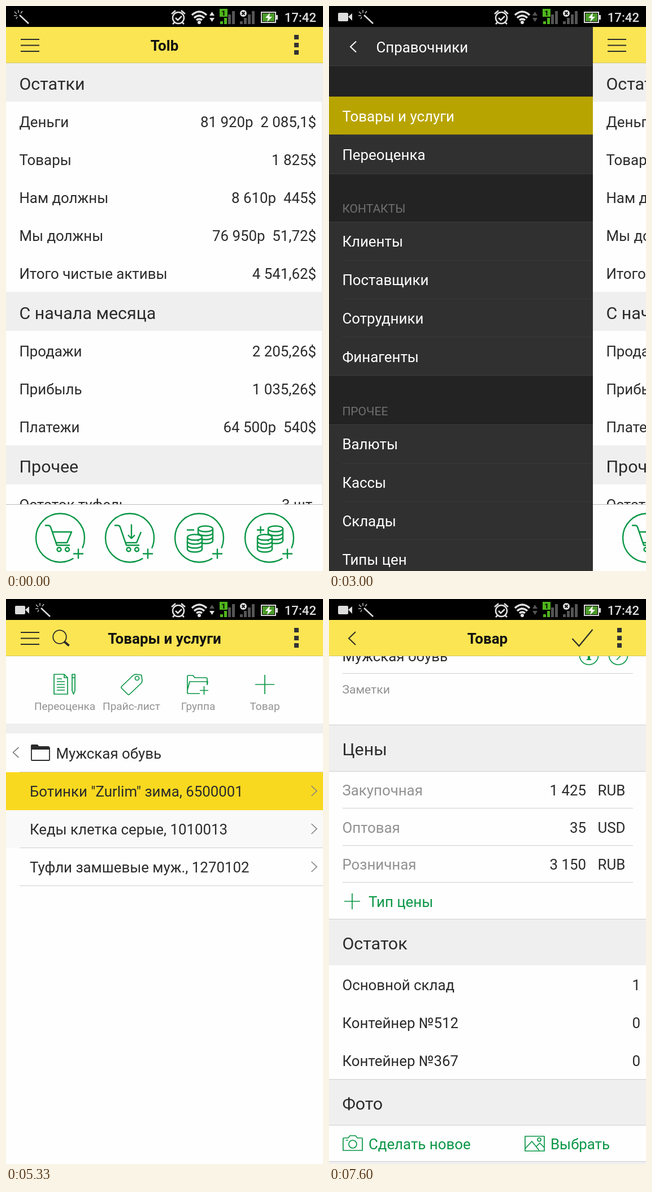
Animation of 561x998 px, one loop 7.67 s. Source, as an HTML page:

```html
<!DOCTYPE html>
<html lang="ru">
<head>
<meta charset="utf-8">
<title>Учёт товаров</title>
<style>
  html, body { margin: 0; width: 100%; height: 100%; overflow: hidden; background: #fefefe; }
  svg { display: block; width: 100vw; height: 100vh; font-family: Roboto, sans-serif; }
  .icon { fill: none; stroke: #0a9646; stroke-width: 1.7; stroke-linejoin: round; }
  .bold { stroke-width: 2.4; }
</style>
</head>
<body>
<svg id="stage" viewBox="0 0 561 998" preserveAspectRatio="none"></svg>
<script>
const W = 561, PANEL = 467, LOOP = 7670, LAST = 114, LEFT = 23.4;
const INK = '#2b2b2b', GREY = '#929292', GREEN = '#0a9646', BAND = '#efefef', LINE = '#cfcfcf';
const OLIVE = '#b8a400', GOLD = '#f9d91f';

// Drawing helpers; text is placed by the middle of its capitals.
const text = (x, y, s, { size = 25.85, fill = INK, anchor = 'start', weight = 400 } = {}) =>
  `<text x="${x}" y="${y + size * 0.355}" font-size="${size}" fill="${fill}" text-anchor="${anchor}" font-weight="${weight}">${s}</text>`;
const rect = (x, y, w, h, fill, extra = '') =>
  `<rect x="${x}" y="${y}" width="${w}" height="${h}" fill="${fill}" ${extra}/>`;
const rule = (y, x = 24, end = W, fill = LINE) => rect(x, y, end - x, 1, fill);
const path = (d, stroke = INK, width = 2, fill = 'none') =>
  `<path d="${d}" stroke="${stroke}" stroke-width="${width}" fill="${fill}"/>`;
const icon = (x, y, d, extra = '', style = '') =>
  `<g class="icon ${style}" transform="translate(${x} ${y})"><path d="${d}"/>${extra}</g>`;
const group = (id, ...parts) => `<g id="${id}">${parts.join('')}</g>`;
const chevron = (x, y, w, h, stroke, width) => path(`M${x} ${y - h}l${w} ${h}l${-w} ${h}`, stroke, width);
const heading = (y, s) => text(LEFT, y, s, { size: 30.4 });

// Navigation bars
const burger = path('M26 59h33M26 69.5h33M26 80h33');
const dots = [51, 65, 78].map(y => rect(510, y, 8, 8, '#333')).join('');
const navBar = (title, extra) => rect(0, 37, W, 63, '#fbe553') + rect(0, 100, W, 1, '#d3c565') +
  text(280.5, 70, title, { size: 26, fill: '#111', anchor: 'middle', weight: 700 }) + dots + extra;

// Home page
const homeRows = [
  [205, 'Деньги', '81 920р\u00a0 2 085,1$'], [272, 'Товары', '1 825$'],
  [339, 'Нам должны', '8 610р\u00a0 445$'], [406, 'Мы должны', '76 950р\u00a0 51,72$'],
  [473, 'Итого чистые активы', '4 541,62$'], [610, 'Продажи', '2 205,26$'],
  [677, 'Прибыль', '1 035,26$'], [744, 'Платежи', '64 500р\u00a0 540$'],
  [881, 'Остаток туфель', '3 шт.']
].map(([y, name, sum]) => text(LEFT, y, name) + text(549, y, sum, { anchor: 'end' })).join('');
const homeBands = [[100, 'Остатки'], [505, 'С начала месяца'], [776, 'Прочее']]
  .map(([y, s]) => rect(0, y, W, 69, BAND) + heading(y + 37, s)).join('');

const wheels = '<circle cx="-2" cy="20.5" r="3.5"/><circle cx="12.5" cy="20.5" r="3.5"/>';
const cartFrame = 'M-27-22h6q3 0 4 3l11 32h23';
const stack = (x, y) => {
  let d = `M${x - 13} ${y}a13 5 0 0 1 26 0a13 5 0 0 1-26 0v21M${x + 13} ${y}v21`;
  for (let i = 1; i < 4; i++) d += `M${x - 13} ${y + 7 * i}a13 5 0 0 0 26 0`;
  return `<path d="${d}" fill="#fefefe"/>`;
};
const coins = stack(11, -16) + stack(-8, -1);
const roundButton = (x, d, extra) => icon(x, 939.5, '',
  '<circle r="43"/><circle cx="32" cy="28" r="12" fill="#fefefe" stroke="none"/>' +
  `<path d="M23 28h18M32 19v18${d}"/>` + extra, 'bold');
const homeTools = rect(0, 880, W, 118, '#fefefe') + rect(0, 880, W, 1, '#bdbdbd') +
  roundButton(96, cartFrame + 'M-14-10.500h34l-8 19h-20', wheels) +
  roundButton(219, cartFrame + 'M20-10.500l-8 19h-20M3-24v25m-6-6l6 6l6-6', wheels) +
  roundButton(342, 'M-22-14h13', coins) +
  roundButton(466, 'M-22-14h13M-15.500-20.500v13', coins);
const home = group('home', rect(0, 100, W, 898, BAND), rect(0, 100, 559, 898, '#fefefe'),
  homeBands, homeRows, homeTools, navBar('Tolb', burger));

// Side menu
const ROW = 67.8;
const menuBlock = (y, names, arrows) => {
  const h = Math.round(names.length * ROW);
  return rect(0, y, PANEL, h, '#303030') + rule(y, 0, PANEL, '#3d3d3d') + rule(y + h, 0, PANEL, '#3d3d3d') +
    names.map((_, i) => i ? rule(Math.round(y + i * ROW), 24, PANEL, '#3a3a3a') : '').join('') +
    names.map((s, i) => text(LEFT, y + 35 + i * ROW, s, { fill: '#fff' }) +
      (arrows ? chevron(433, y + 34 + i * ROW, 9, 8.5, '#fff', 3) : '')).join('');
};
const menuHead = (y, s) => text(LEFT, y, s, { size: 21, fill: '#707070' });
const menuTop = (x, s, weight) => rect(0, 0, PANEL, 998, '#232323') + rect(0, 37, PANEL, 68, '#303030') +
  rule(105, 0, PANEL, '#3d3d3d') + text(x, 72.5, s, { fill: '#fff', weight });
const pick = (id, y, s) => group(id, rect(0, y, PANEL, 67, OLIVE), text(LEFT, y + 35, s, { fill: '#fff' }));

const mainMenu = group('mainMenu', menuTop(LEFT, 'Начало', 700),
  menuHead(168, 'БЫСТРЫЕ ДЕЙСТВИЯ'), menuBlock(192, ['Продать', 'Оплатить', 'Принять оплату', 'Курсы валют']),
  menuHead(526, 'ДВИЖЕНИЯ'), menuBlock(549, ['Заказы и продажи', 'Деньги', 'Закупки и склад']),
  menuBlock(807, ['Справочники', 'Отчеты', 'Прочее'], true),
  group('pickRefs', pick('refsRow', 807, 'Справочники'), chevron(433, 841, 9, 8.5, '#fff', 3)));
const subMenu = group('subMenu', menuTop(83.5, 'Справочники', 400), chevron(48, 72, -10, 9.5, '#fff', 2),
  menuBlock(160, ['Товары и услуги', 'Переоценка']), pick('pickGoods', 160, 'Товары и услуги'),
  menuHead(358, 'КОНТАКТЫ'), menuBlock(381, ['Клиенты', 'Поставщики', 'Сотрудники', 'Финагенты']),
  menuHead(716, 'ПРОЧЕЕ'), menuBlock(739, ['Валюты', 'Кассы', 'Склады', 'Типы цен']));

// Goods page
const folder = y => path(`M45 ${y - 8}v21q0 1 1 1h30q1 0 1-1v-21z`, INK, 1.8) +
  path(`M44 ${y - 5}v-7q0-2 2-2h9q2 0 3 3h17q2 0 2 2v4z`, 'none', 0, INK);
const next = y => chevron(540.500, y, 9.500, 9, '#858585', 1.7);
const listRow = (y, h, fill, content) => rect(0, y + 1, W, h, fill) + rule(y + h) + content;
const gold = (id, y) => rect(0, y + 1, W, 67, GOLD, `id="${id}"`);
const stripe = i => i % 2 ? '#f9f9f9' : '#fefefe';
const folderRow = (y, s) => folder(y + 34) + text(88.500, y + 35.500, s);

const folders = group('folders', ['Женская обувь', 'Мужская обувь', 'Прочее', 'Спортивная обувь', 'Услуги']
  .map((s, i) => {
    const y = Math.round(237 + i * ROW);
    return listRow(y, 68, stripe(i), (i === 1 ? gold('pickFolder', y) : '') + folderRow(y, s) + next(y + 34));
  }).join(''));
const shoes = group('shoes', rect(0, 237, W, 761, '#fefefe'),
  listRow(237, 68, '#fefefe', folderRow(237, 'Мужская обувь') + chevron(22.500, 271, -10, 9, '#858585', 1.7)),
  ['Ботинки "Zurlim" зима, 6500001', 'Кеды клетка серые, 1010013', 'Туфли замшевые муж., 1270102']
    .map((s, i) => {
      const y = 305 + i * 67;
      return listRow(y, 67, stripe(i), (i ? '' : gold('pickShoes', y)) + text(42, y + 35, s) + next(y + 34));
    }).join(''));
const goodsTools = rect(0, 100, W, 120, '#fefefe') + rect(0, 220, W, 17.500, BAND) +
  [[104, 'Переоценка'], [222, 'Прайс-лист'], [340, 'Группа'], [458, 'Товар']]
    .map(([x, s]) => text(x, 189.500, s, { size: 19, fill: GREY, anchor: 'middle' })).join('') +
  icon(104, 151, 'M-19-18h18l6 6v29h-24zM-1-18v6h6M-14-10h9M-14-5h14M-14 0h14M-14 5h14M-14 10h14M13-18h5v29l-2.500 6l-2.500-6zM13-12h5') +
  icon(222, 151, 'M-17 3l20-19q2-2 5-2l8 1q2 0 2 2l1 8q0 3-2 5l-20 19q-2 2-4 0l-10-10q-2-2 0-4z', '<circle cx="10" cy="-11" r="3.500"/>') +
  icon(340, 151, 'M3 16h-20q-2 0-2-2v-28q0-2 2-2h8l3 4h20q2 0 2 2v10M-19 10l4-15h32l-1 6M3 10.500h15M10.500 3v15') +
  icon(458, 151, 'M-17 0h34M0-17v34');
const search = '<circle cx="95" cy="67" r="11.800" fill="none" stroke="#2b2b2b" stroke-width="1.800"/>' +
  path('M103.500 75.500l8 7', INK, 3.8);

// Product form
const formFields = [[154, 'Наименование', 'Ботинки "Zurlim" зима', 229], [257, 'Артикул', '6500001', 333],
  [362, 'Штрихкод', '', 440], [467, 'Единица измерения', 'шт', 543], [571, 'Группа', 'Мужская обувь', 646],
  [675, 'Заметки', '', 0]]
  .map(([y, label, value, end]) => text(LEFT, y, label, { size: 21.100, fill: GREY }) +
    text(LEFT, y + 45, value) + (end ? rule(end, 24, 538) : '')).join('');
const prices = [['Закупочная', '1 425', 'RUB'], ['Оптовая', '35', 'USD'], ['Розничная', '3 150', 'RUB']]
  .map(([name, sum, unit], i) => {
    const y = 853 + i * 65.500;
    return text(LEFT, y, name, { fill: GREY }) + text(455, y, sum, { anchor: 'end' }) +
      text(475.500, y, unit) + rule(Math.round(y + 31), 24, 538);
  }).join('');
const stock = [['Основной склад', 1], ['Контейнер №512', 0], ['Контейнер №367', 0]]
  .map(([name, n], i) => text(LEFT, 1197 + i * 67, name) + text(551, 1197 + i * 67, n, { anchor: 'end' })).join('');
const formBand = (y, s) => rect(0, y, W, 82, BAND) + rule(y, 0) + heading(y + 43.500, s);
const form = group('form', rect(0, 80, W, 1500, '#fefefe'),
  rect(0, 109, W, 17, BAND), rule(126, 0), formFields,
  icon(507, 408, '', '<rect x="-18" y="-13" width="36" height="26" rx="2"/>'),
  icon(460, 614.500, '', '<circle r="16.500"/>'),
  `<text x="460" y="623" font-size="27" font-weight="700" fill="${GREEN}" text-anchor="middle" font-family="Noto Serif, serif">i</text>`,
  icon(512, 614.500, 'M-3-8l8 8l-8 8', '<circle r="16.500"/>'),
  formBand(737, 'Цены'), rule(819, 0), prices,
  icon(41, 1049, 'M-14 0h28M0-14v28'), text(70, 1050, 'Тип цены', { fill: GREEN }),
  formBand(1080, 'Остаток'), stock, formBand(1363, 'Фото'), rule(1444, 0),
  icon(42, 1477, 'M-17-9q0-1 1-1h8l3-4h10l3 4h8q1 0 1 1v21h-34zM-12-6h4', '<circle cy="1" r="7"/>'),
  text(70, 1478, 'Сделать новое', { fill: GREEN }),
  icon(364, 1477, 'M-17-13h34v26h-34zM-17 9l12-13l13 16M3 5l6-6l8 8', '<circle cx="8" cy="-7" r="3"/>'),
  text(392, 1478, 'Выбрать', { fill: GREEN }),
  rect(0, 1508, W, 60, BAND), rule(1508, 0));
const check = path('M430.500 70l12 13l24-29', INK, 2.2);

// Status bar
const bars = (x, colors) => colors.map((c, i) => rect(x + i * 7, 27 - i * 6, 5, 5 + i * 6, c)).join('');
const status = rect(0, 0, W, 37, '#000') +
  group('camera', rect(16, 12, 18, 15, '#ddd', 'rx="2"'), path('M34 19l7-6v13z', 'none', 0, '#ddd')) +
  group('wand', path('M24 16l16 15', '#ddd', 2.5), path('M22 7v5M15 10l4 4M14 17h5M29 9l-3 4M18 23l2-4', '#bbb', 1.5)) +
  '<g fill="none" stroke="#e2e2e2"><circle cx="305" cy="21" r="10" stroke-width="2.500"/>' +
  '<path d="M293 14l7-6M317 14l-7-6M298 29l-3 3M312 29l3 3M300 21l4 4l7-7" stroke-width="2.500"/>' +
  '<path d="M329 16q13-12 26 0M333 21q9-8 18 0M337 25q5-4 10 0" stroke-width="3.500"/></g>' +
  '<circle cx="342" cy="29" r="3" fill="#e2e2e2"/>' +
  '<path id="up" d="M360 17h9l-4.500-7z"/><path id="down" d="M360 21h9l-4.500 7z"/>' +
  bars(379, ['#4fb51c', '#4fb51c', '#555', '#555']) +
  rect(378, 5, 14, 14, '#4fb51c') + text(385, 12, '1', { size: 13, fill: '#000', anchor: 'middle', weight: 700 }) +
  bars(414, ['#555', '#555', '#555', '#555']) +
  '<circle cx="420" cy="13" r="6" fill="#e2e2e2"/>' + path('M417.500 10.500l5 5m0-5l-5 5', '#000', 1.800) +
  rect(452, 11, 25, 18, '#000', 'stroke="#ddd" stroke-width="2"') + rect(454, 13, 21, 14, '#4c9b2b') +
  rect(478, 16, 3, 8, '#ddd') + path('M467 12l-8 9h5l-2 7l9-9h-5z', 'none', 0, '#fff') +
  text(549, 20.500, '17:42', { size: 22.200, fill: '#dedede', anchor: 'end', weight: 500 });

document.getElementById('stage').innerHTML = mainMenu + subMenu +
  group('view', rect(0, 37, W, 961, '#fefefe'), home,
    group('goods', group('goodsBody', rect(0, 100, W, 898, '#fefefe'), folders, shoes, goodsTools), form,
      group('goodsNav', navBar('Товары и услуги', burger + search)),
      group('formNav', navBar('Товар', check + chevron(47, 69.500, -12, 11.500, INK, 2))))) + status;

const el = id => document.getElementById(id);
const move = (id, x, y = 0) => el(id).setAttribute('transform', `translate(${x} ${y})`);
const show = (id, on) => el(id).setAttribute('visibility', on ? 'visible' : 'hidden');
const fade = (id, a) => el(id).setAttribute('opacity', a);
const paint = (id, lit) => el(id).setAttribute('fill', lit ? '#e2e2e2' : '#555');

// The CSS "ease" curve, solved by bisection.
function ease(p) {
  if (p <= 0) return 0;
  if (p >= 1) return 1;
  let lo = 0, hi = 1, u = 0.5;
  for (let i = 0; i < 18; i++) {
    u = (lo + hi) / 2;
    if (0.75 * u * (1 - u) + u ** 3 < p) lo = u; else hi = u;
  }
  return 0.3 * u * (1 - u) ** 2 + 3 * u * u * (1 - u) + u ** 3;
}
const ramp = (n, from, to) => ease((n - from + 0.6) / (to - from + 0.6));

// n counts screen refreshes, 15 per second.
function draw(n) {
  show('camera', n > 0);
  move('wand', n > 0 ? 38 : 0);
  paint('up', n < 1);
  paint('down', n < 1 || (n >= 57 && n < 111));

  move('view', PANEL * (ramp(n, 10, 15) - ramp(n, 49, 54)));
  const sub = ramp(n, 32, 38);
  move('mainMenu', -0.2 * PANEL * sub);
  move('subMenu', PANEL * (1 - sub));
  show('pickRefs', n >= 30);
  show('pickGoods', n >= 45);

  const goodsOpen = n >= 49;
  show('home', !goodsOpen);
  show('goods', goodsOpen);
  const list = ramp(n, 68, 73);
  move('folders', -0.2 * W * list);
  move('shoes', W * (1 - list));
  fade('pickFolder', n >= 65 ? 1 : 0);
  fade('pickShoes', n >= 80 ? 1 : 0);

  const page = ramp(n, 88, 94);
  move('goodsBody', -0.2 * W * page);
  move('form', W * (1 - page), n < 100 ? 8 : -515 * ease((n - 100) / 14));
  fade('formNav', page);
}

const start = performance.now();
function tick(now) {
  const t = Math.max(0, now - start) % LOOP;
  draw(Math.min(LAST, Math.floor((t + 4) * 0.015)));
  requestAnimationFrame(tick);
}
draw(0);
requestAnimationFrame(tick);
</script>
</body>
</html>
```
